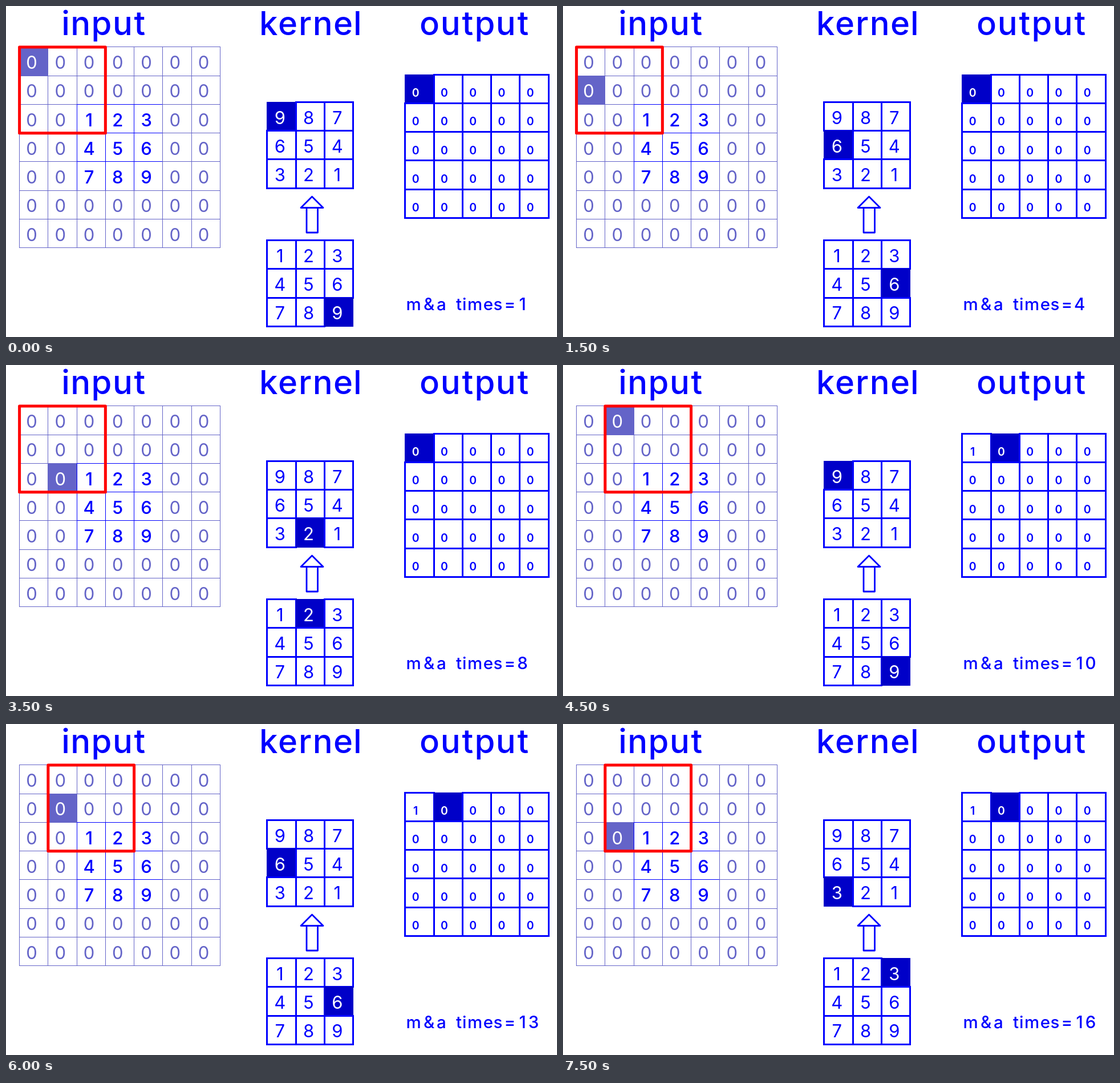
These frames come from a looping animation (966 by 580 pixels, 8 s). An HTML page:

```html
<!DOCTYPE html>
<html lang="en">
<head>
<meta charset="utf-8">
<title>Convolution</title>
<style>
  html, body { margin: 0; width: 100%; height: 100%; overflow: hidden; background: #fff; }
  svg { display: block; width: 966px; height: 580px; }
  text { font-family: Inter, "Open Sans", sans-serif; text-anchor: middle; }
  .cells rect { shape-rendering: crispEdges; }
</style>
</head>
<body>
<svg id="stage" viewBox="0 0 966 580"></svg>
<script>
const BLUE = '#0000ff', DARK = '#0000c8', PALE = '#6464c8';
const SCALE = 1.005, CELL = 50, PITCH = CELL * SCALE;
const STEP_MS = 500, STEPS = 16;
const stage = document.getElementById('stage');

const kernel = [[1, 2, 3], [4, 5, 6], [7, 8, 9]];
const flipped = kernel.map(row => [...row].reverse()).reverse();
const isInner = (r, c) => r > 1 && r < 5 && c > 1 && c < 5;
const input = Array.from({ length: 7 }, (_, r) =>
  Array.from({ length: 7 }, (_, c) => isInner(r, c) ? kernel[r - 2][c - 2] : 0));

// Letter widths of the plotter-style lettering, in font units.
const advance = { i: 8, l: 8, t: 12, r: 13, ' ': 16, k: 17, s: 17, e: 18, '&': 26, '=': 26, m: 30 };
const widthOf = ch => advance[ch] || (/\d/.test(ch) ? 20 : 19);

function label(str, x, y, scale, size) {
  const centres = [...str].map(ch => {
    const w = widthOf(ch) * scale;
    x += w;
    return (x - w / 2).toFixed(1);
  });
  return `<text x="${centres.join(' ')}" y="${y}" font-size="${size}" font-weight="450" fill="${BLUE}">` +
    str.replace('&', '&amp;') + '</text>';
}

// Pixel centre of the i-th grid line, snapped after scaling the layout.
const edge = (start, i) => Math.floor((start + 0.5 + i * CELL) * SCALE) + 0.5;

function grid(values, { x, y, line = 3, size = 31, weight = 400, dx = 22, base = 38.7, active, pale }) {
  let out = '';
  values.forEach((row, r) => row.forEach((value, c) => {
    const on = r === active[0] && c === active[1];
    const faded = pale && pale(r, c);
    const colour = faded ? PALE : BLUE;
    const fill = faded ? PALE : DARK;
    const left = edge(x, c), top = edge(y, r);
    out += `<rect x="${left}" y="${top}" width="${edge(x, c + 1) - left}" height="${edge(y, r + 1) - top}"` +
      ` fill="${on ? fill : '#fff'}" stroke="${on ? fill : colour}" stroke-width="${on ? 1 : line}" stroke-linejoin="round"/>` +
      `<text x="${x * SCALE + c * PITCH + dx}" y="${y * SCALE + r * PITCH + base}" font-size="${size}"` +
      ` font-weight="${faded ? 400 : weight}" fill="${on ? '#fff' : colour}">${value}</text>`;
  }));
  return `<g class="cells">${out}</g>`;
}

// Output values after the given number of multiply-and-add operations.
function convolve(count) {
  const out = Array.from({ length: 5 }, () => Array(5).fill(0));
  for (let n = 0; n < count; n++) {
    const cell = Math.floor(n / 9), r = Math.floor(n % 9 / 3), c = n % 3;
    const row = Math.floor(cell / 5), col = cell % 5;
    out[row][col] += input[row + r][col + c] * flipped[r][c];
  }
  return out;
}

function render(step) {
  const cell = Math.floor(step / 9);
  const row = Math.floor(cell / 5), col = cell % 5;
  const r = Math.floor(step % 9 / 3), c = step % 3;

  stage.innerHTML =
    label('input', 96.7, 51, 1.94, 58) +
    label('kernel', 443.7, 51, 1.94, 58) +
    label('output', 724, 51, 1.94, 58) +
    grid(input, { x: 23, y: 71, line: 1, weight: 500, active: [row + r, col + c], pale: (a, b) => !isInner(a, b) }) +
    `<rect x="${23.6 + col * PITCH}" y="${71.9 + row * PITCH}" width="${3 * PITCH}" height="${3 * PITCH}"` +
    ' fill="none" stroke="#f00" stroke-width="5" stroke-linejoin="round"/>' +
    grid(flipped, { x: 455, y: 167, dx: 23, active: [r, c] }) +
    grid(kernel, { x: 455, y: 408, dx: 23, active: [2 - r, 2 - c] }) +
    `<path d="M536.5 334L556 353.5H517ZM527 353.5H546.5V397H527Z" fill="none" stroke="${BLUE}" stroke-width="2.8" stroke-linejoin="round"/>` +
    grid(convolve(step + 1), { x: 696, y: 119, size: 19.5, weight: 600, dx: 18.7, base: 39.6, active: [row, col] }) +
    label('m&a times=' + (step + 1), 700, 533, 0.97, 29.5);
}

let shown = -1;
const start = performance.now();
function tick() {
  const step = Math.floor((performance.now() - start) / STEP_MS) % STEPS;
  if (step !== shown) render(shown = step);
  requestAnimationFrame(tick);
}
tick();
</script>
</body>
</html>
```
